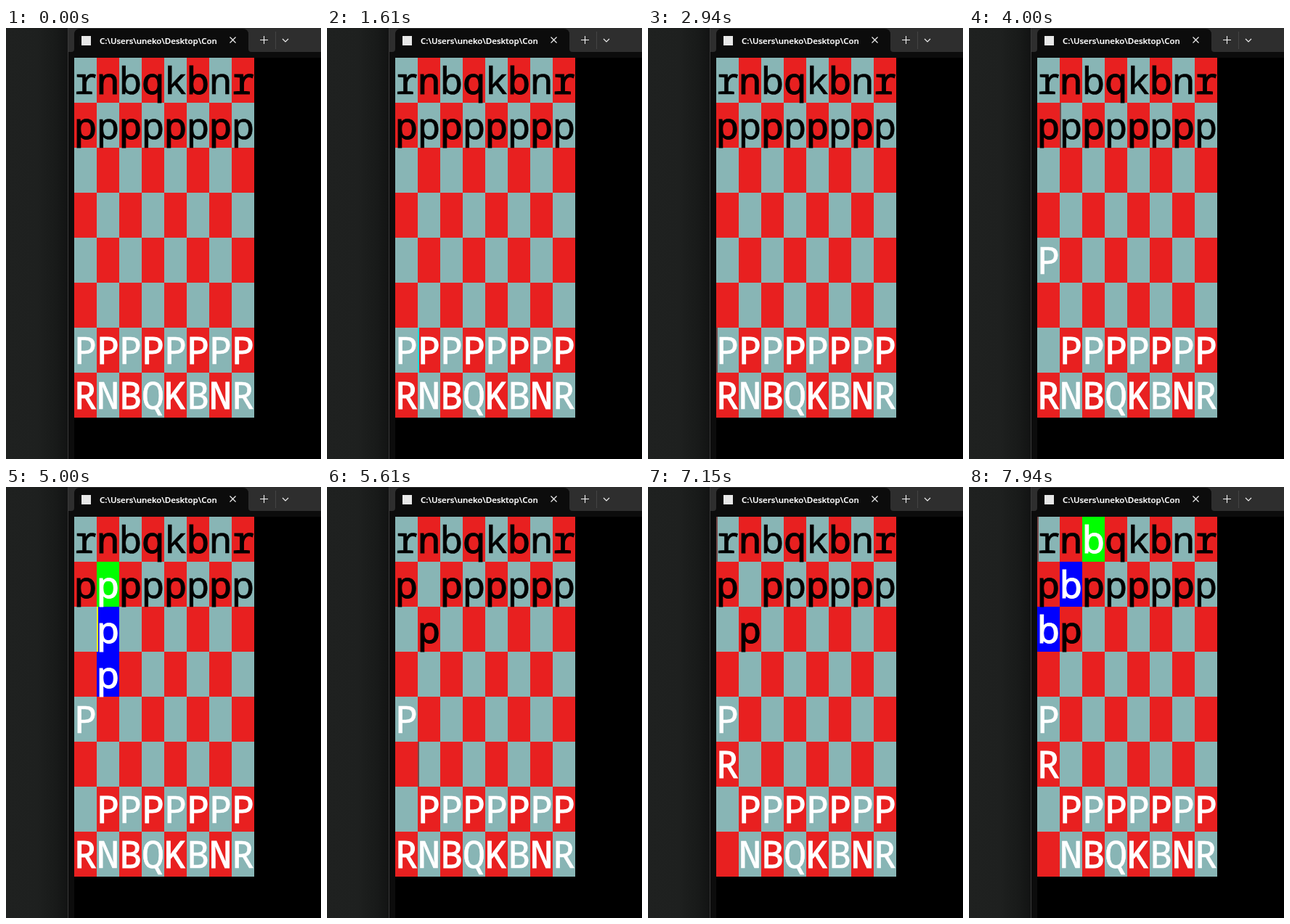
Animation of 434x594 px, one loop 8000 ms. Source, as an HTML page:

```html
<!DOCTYPE html>
<html lang="en">
<head>
<meta charset="utf-8">
<title>Console chess</title>
<style>
  html, body { margin: 0; width: 100%; height: 100%; overflow: hidden; background: #000; }
  svg { display: block; }
  .piece { font: 500 51.67px "Noto Sans Mono", "DejaVu Sans Mono", monospace; text-anchor: middle; }
  .title { font: 600 11.5px "Open Sans", "Noto Sans", sans-serif; fill: #fff; stroke: #fff; stroke-width: .2; }
</style>
</head>
<body>
<svg id="stage" width="434" height="594" viewBox="0 0 434 594">
  <defs>
    <linearGradient id="shade">
      <stop offset="0" stop-color="#1f2120"/>
      <stop offset=".5" stop-color="#1e201f"/>
      <stop offset=".8" stop-color="#181a19"/>
      <stop offset="1" stop-color="#121313"/>
    </linearGradient>
  </defs>
  <rect width="86" height="594" fill="url(#shade)"/>
  <rect x="85" width="1" height="594" fill="#3a3a3a"/>
  <rect x="86" width="348" height="594" fill="#0c0c0c"/>
  <rect x="86" width="348" height="33" fill="#2e2e2e"/>
  <path d="M86 33h4q4 0 4-4V9q0-8 8-8h224q8 0 8 8v20q0 4 4 4z" fill="#0c0c0c"/>
  <rect x="94" y="41" width="340" height="553" fill="#000"/>
  <rect x="104" y="11" width="13" height="13" fill="#e8e8e8"/>
  <text class="title" x="129" y="22">C:\Users\uneko\Desktop\Con</text>
  <g fill="none" stroke="#f2f2f2" stroke-width="1.1">
    <path d="M308.5 12.5l8 8m0-8l-8 8"/>
    <path d="M350 16.5h11m-5.5-5.5v11"/>
    <path d="M381 15l4 4 4-4"/>
    <path d="M371.5 5v24" stroke="#444"/>
  </g>
  <g id="board"></g>
  <rect id="cursor" width="2" height="62"/>
</svg>
<script>
const LOOP = 8000, SIZE = 8, LEFT = 94, TOP = 41, CELL_W = 31, CELL_H = 62;
const TEAL = '#88b5b5', RED = '#e82020', GREEN = '#00ff00', BLUE = '#0000ff';
const INVERSE = { [TEAL]: '#774a4a', [RED]: '#17dfdf', [GREEN]: '#ff00ff', [BLUE]: '#ffff00' };
const START = 'rnbqkbnr' + 'p'.repeat(8) + ' '.repeat(32) + 'P'.repeat(8) + 'RNBQKBNR';

// Directions and reach of the pieces that get picked up.
const RULES = {
  p: { reach: 2, dirs: [[0, 1]] },
  P: { reach: 2, dirs: [[0, -1]] },
  R: { reach: 7, dirs: [[0, 1], [0, -1], [1, 0], [-1, 0]] },
  b: { reach: 7, dirs: [[1, 1], [1, -1], [-1, 1], [-1, -1]] }
};
const STEPS = { u: [0, -1], d: [0, 1], l: [-1, 0], r: [1, 0] };

// Start time, interval and keys: u d l r move, e enters, + and - blink the cursor.
const KEYS = [
  [400, 0, '+'], [740, 0, '-'], [1000, 78, '+rddddd'], [1610, 0, 'd'], [1810, 0, 'e'],
  [2140, 133, 'ulrd'], [2810, 0, 'e'], [2940, 0, 'l'], [3070, 0, 'e'], [3210, 0, 'u'],
  [3340, 0, 'ue'], [3480, 0, 'u'], [3740, 130, 'uur'], [4330, 0, '-'], [4670, 0, '+'],
  [4800, 0, 'e'], [5000, 0, 'd'], [5140, 0, 'e'], [5340, 70, 'dd'], [5550, 65, 'dld'],
  [5880, 110, 'deuu'], [6560, 102, 'euuuuurr'], [7480, 230, 'ell']
];

const setAttrs = (el, attrs) => {
  for (const key in attrs) el.setAttribute(key, attrs[key]);
};
const svgEl = (name, attrs, parent) => {
  const el = document.createElementNS('http://www.w3.org/2000/svg', name);
  setAttrs(el, attrs);
  return parent.appendChild(el);
};
const board = document.getElementById('board');
const cursor = document.getElementById('cursor');

const cells = Array.from({ length: SIZE * SIZE }, (_, i) => {
  const x = LEFT + (i % SIZE) * CELL_W, y = TOP + Math.floor(i / SIZE) * CELL_H;
  return {
    x, y,
    base: (i + Math.floor(i / SIZE)) % 2 ? RED : TEAL,
    rect: svgEl('rect', { x, y, width: CELL_W, height: CELL_H }, board)
  };
});
for (const cell of cells) {
  cell.text = svgEl('text', { class: 'piece', x: cell.x + CELL_W / 2, y: cell.y + 50 }, board);
}

function targetsOf(pieces, from) {
  const { reach, dirs } = RULES[pieces[from]];
  const found = [];
  for (const [dx, dy] of dirs) {
    let x = from % SIZE, y = Math.floor(from / SIZE);
    for (let n = 0; n < reach; n++) {
      x += dx;
      y += dy;
      const inside = x >= 0 && x < SIZE && y >= 0 && y < SIZE;
      if (!inside || pieces[y * SIZE + x] !== ' ') break;
      found.push(y * SIZE + x);
    }
  }
  return found;
}

function press(state, key) {
  if (key === '+' || key === '-') {
    state.visible = key === '+';
  } else if (key === 'e') {
    const at = state.y * SIZE + state.x;
    if (state.selected < 0) {
      state.selected = at;
      state.targets = targetsOf(state.pieces, at);
    } else {
      if (state.targets.includes(at)) {
        state.pieces[at] = state.pieces[state.selected];
        state.pieces[state.selected] = ' ';
      }
      state.selected = -1;
      state.targets = [];
    }
  } else {
    state.x += STEPS[key][0];
    state.y += STEPS[key][1];
    state.visible = true;
  }
}

function stateAt(time) {
  const state = { pieces: [...START], x: 0, y: 0, visible: false, selected: -1, targets: [] };
  for (const [start, gap, keys] of KEYS) {
    [...keys].forEach((key, i) => {
      if (start + i * gap <= time) press(state, key);
    });
  }
  return state;
}

function draw(time) {
  const state = stateAt(time);
  const colorOf = i => i === state.selected ? GREEN
    : state.targets.includes(i) ? BLUE : cells[i].base;
  cells.forEach((cell, i) => {
    const color = colorOf(i), lit = color !== cell.base;
    const piece = state.pieces[lit ? state.selected : i];
    const ink = lit || piece < 'a' ? '#fff' : '#000';
    cell.rect.setAttribute('fill', color);
    cell.text.textContent = piece.trim();
    // Letters look heavier on the saturated squares.
    setAttrs(cell.text, { fill: ink, stroke: ink, 'stroke-width': color === TEAL ? 0.7 : 1.1 });
  });
  const at = state.y * SIZE + state.x;
  setAttrs(cursor, {
    x: cells[at].x, y: cells[at].y, fill: INVERSE[colorOf(at)],
    visibility: state.visible ? 'visible' : 'hidden'
  });
}

function tick() {
  draw(performance.now() % LOOP);
  requestAnimationFrame(tick);
}
tick();
</script>
</body>
</html>
```
